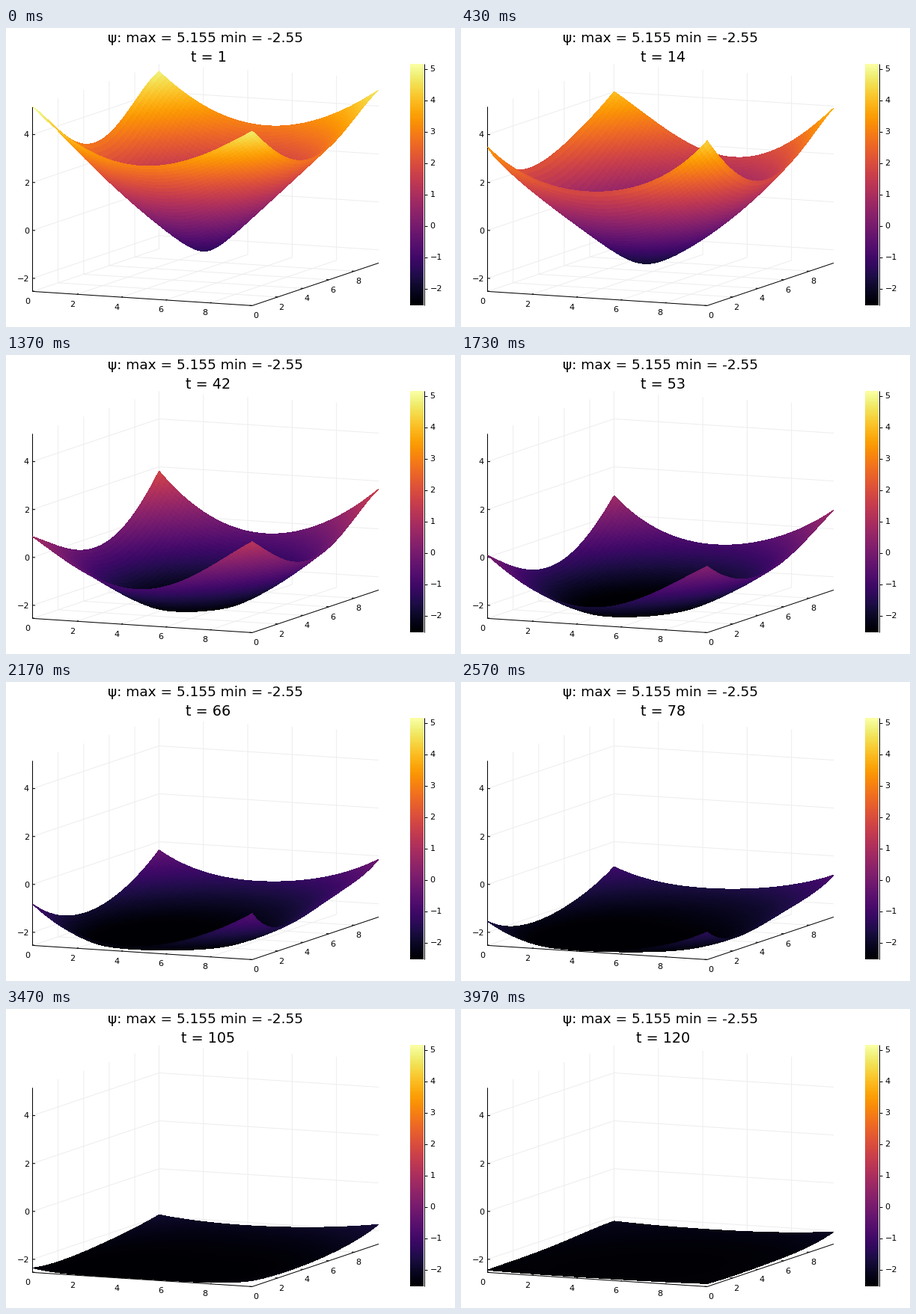
Animation, 600 px wide and 400 px high, one loop 4.01 s. Source, as a matplotlib script:

```python
import numpy as np
import matplotlib.pyplot as plt
from matplotlib.animation import FuncAnimation
from matplotlib.collections import LineCollection, QuadMesh
from matplotlib.colors import Normalize

plt.rcParams["font.family"] = "DejaVu Sans"

W, H, DPI = 600, 400, 100
PX = 72 / DPI
STEPS, SLOTS, SLOT_MS = 120, 401, 10
SIDE, LOW, HIGH = 9.9, -2.55, 5.155
CELLS = 60

# Heights around the rim (five per side, corners shared),
# then slope, roundness and x-centre of the bowl.
TIMES = np.array([1, 14, 27, 42, 66, 90, 120])
POSES = np.array([
    [5.155, 3.5, 2.98, 3.5, 4.73, 3.23, 2.78, 3.55,
     4.67, 3.37, 2.88, 3.35, 4.86, 3.6, 2.78, 3.55, 1, .65, 4.95],
    [3.48, 2.15, 1.9, 2.5, 4.33, 2.45, 1.88, 2.65,
     3.92, 2.1, 1.62, 2.5, 4.01, 2.98, 2.22, 2.08, 1.02, 1.1, 4.1],
    [1.8, .98, .65, 1.38, 3.48, 1.05, .83, 1.65,
     2.95, 1, .43, 1.35, 3.02, 1.6, 1.07, 1.08, .7, 2, 3.9],
    [.86, -.55, -1.05, -.25, 1.24, .05, -.3, .5,
     1.67, .1, -.5, 0, 1.83, .12, -.48, -.05, .25, 2, 4],
    [-.82, -2.12, -2.3, -1.75, -.63, -1.6, -1.3, -.85,
     -.135, -1.04, -1.37, -1.23, -.35, -1.4, -1.9, -1.76, -.2, 2, 4.5],
    [-2.1, -2.53, -2.55, -2.45, -2.0, -2.25, -2.15, -1.86,
     -1.32, -1.73, -1.92, -1.89, -1.54, -2.03, -2.3, -2.4, -.12, 2, 5],
    [-2.46, -2.5, -2.5, -2.48, -2.43, -2.46, -2.43, -2.34,
     -2.04, -2.22, -2.28, -2.27, -2.19, -2.28, -2.39, -2.44, 0, 2, 5],
])
SLOPES = np.gradient(POSES, TIMES, axis=0)

s = np.linspace(0, 1, CELLS + 1)
U, V = np.meshgrid(s, s)
# Maps five evenly spaced rim heights to a smooth curve over s.
CURVE = np.vander(s, 5) @ np.linalg.inv(np.vander(np.linspace(0, 1, 5), 5))


def project(x, y, z):
    u, v = x / SIDE, y / SIDE
    return (35.5 + 293.5 * u + 169 * v,
            352.4 + 19 * u - 57 * v - 32.05 * (z - LOW))


def pose(t):
    """Cubic Hermite blend of the key poses."""
    i = min(np.searchsorted(TIMES, t, "right") - 1, len(TIMES) - 2)
    h = TIMES[i + 1] - TIMES[i]
    q = (t - TIMES[i]) / h
    return ((2 * q**3 - 3 * q**2 + 1) * POSES[i]
            + (3 * q**2 - 2 * q**3) * POSES[i + 1]
            + h * (q**3 - 2 * q**2 + q) * SLOPES[i]
            + h * (q**3 - q**2) * SLOPES[i + 1])


def heights(t):
    """Rounded cone, bent by a Coons patch to meet the rim."""
    p = pose(t)
    rim = np.append(p[:16], p[0])
    slope, roundness, cx = p[16:]
    bowl = slope * np.sqrt((SIDE * U - cx)**2 + (SIDE * V - 4.95)**2
                           + roundness**2)
    front = CURVE @ rim[0:5] - bowl[0]
    right = CURVE @ rim[4:9] - bowl[:, -1]
    back = CURVE @ rim[12:7:-1] - bowl[-1]
    left = CURVE @ rim[16:11:-1] - bowl[:, 0]
    sides = ((1 - V) * front + V * back
             + (1 - U) * left[:, None] + U * right[:, None])
    corners = ((1 - V) * ((1 - U) * front[0] + U * front[-1])
               + V * ((1 - U) * back[0] + U * back[-1]))
    lift = bowl + sides - corners - LOW
    return LOW + (lift + np.sqrt(lift**2 + .003)) / 2


fig = plt.figure(figsize=(W / DPI, H / DPI), dpi=DPI, facecolor="white")
ax = fig.add_axes([0, 0, 1, 1])
ax.set_xlim(0, W)
ax.set_ylim(H, 0)
ax.axis("off")
norm = Normalize(LOW, HIGH)


def strokes(lines, color, z):
    ax.add_collection(LineCollection(lines, colors=color, linewidths=PX,
                                     zorder=z), autolim=False)


def path(*points):
    return [project(*p) for p in points]


def label(x, y, text, ha="center", size=8):
    return ax.text(x, y, text, ha=ha, va="baseline", fontsize=size)


def signed(n):
    return str(n).replace("-", "\u2212")


grid, axes = [], [
    path((0, 0, HIGH), (0, 0, LOW), (SIDE, 0, LOW), (SIDE, SIDE, LOW)),
]
tick = .012 * SIDE
for n in range(0, 10, 2):
    grid.append(path((n, 0, LOW), (n, SIDE, LOW), (n, SIDE, HIGH)))
    grid.append(path((SIDE, n, LOW), (0, n, LOW), (0, n, HIGH)))
    axes.append(path((n, 0, LOW), (n, tick, LOW)))
    axes.append(path((SIDE, n, LOW), (SIDE - tick, n, LOW)))
    x, y = project(n, 0, LOW)
    label(x - 6.5, y + 16.5, str(n))
    x, y = project(SIDE, n, LOW)
    label(x + 5, y + 17, str(n))
for n in range(-2, 5, 2):
    grid.append(path((0, 0, n), (0, SIDE, n), (SIDE, SIDE, n)))
    axes.append(path((0, 0, n), (tick, 0, n)))
    label(31, project(0, 0, n)[1] + 4, signed(n), "right")

# Colour bar
ax.imshow(np.linspace(HIGH, LOW, 256)[:, None], cmap="inferno", norm=norm,
          extent=(540, 558, 371, 48), aspect="auto", interpolation="nearest")
ax.set_xlim(0, W)
ax.set_ylim(H, 0)
axes.append([(558.5, 48), (558.5, 371)])
for n in range(-2, 6):
    y = 264.5 - 42 * n
    axes.append([(558.5, y), (563, y)])
    label(566.5, y + 4, signed(n), "left")

strokes(grid, "0.93", 1)
strokes(axes, "black", 1.5)
label(267, 19, "ψ: max = 5.155 min = -2.55", size=13.3)
clock = label(270.5, 45, "", size=13.8)
surfaces = []


def update(slot):
    t = min(STEPS, int((slot + .5) * .3) + 1)
    z = heights(t)[::-1]
    # Rows run back to front so nearer cells cover farther ones.
    x, y = project(SIDE * U, SIDE * V[::-1], z)
    cells = (z[1:, 1:] + z[1:, :-1] + z[:-1, 1:] + z[:-1, :-1]) / 4
    while surfaces:
        surfaces.pop().remove()
    mesh = QuadMesh(np.dstack([x, y]), antialiased=False, cmap="inferno",
                    norm=norm, array=cells, zorder=2)
    ax.add_collection(mesh, autolim=False)
    surfaces.append(mesh)
    clock.set_text(f"t = {t}")
    return mesh, clock


anim = FuncAnimation(fig, update, frames=SLOTS, interval=SLOT_MS,
                     repeat=True, repeat_delay=0, blit=False)
plt.show()
```
